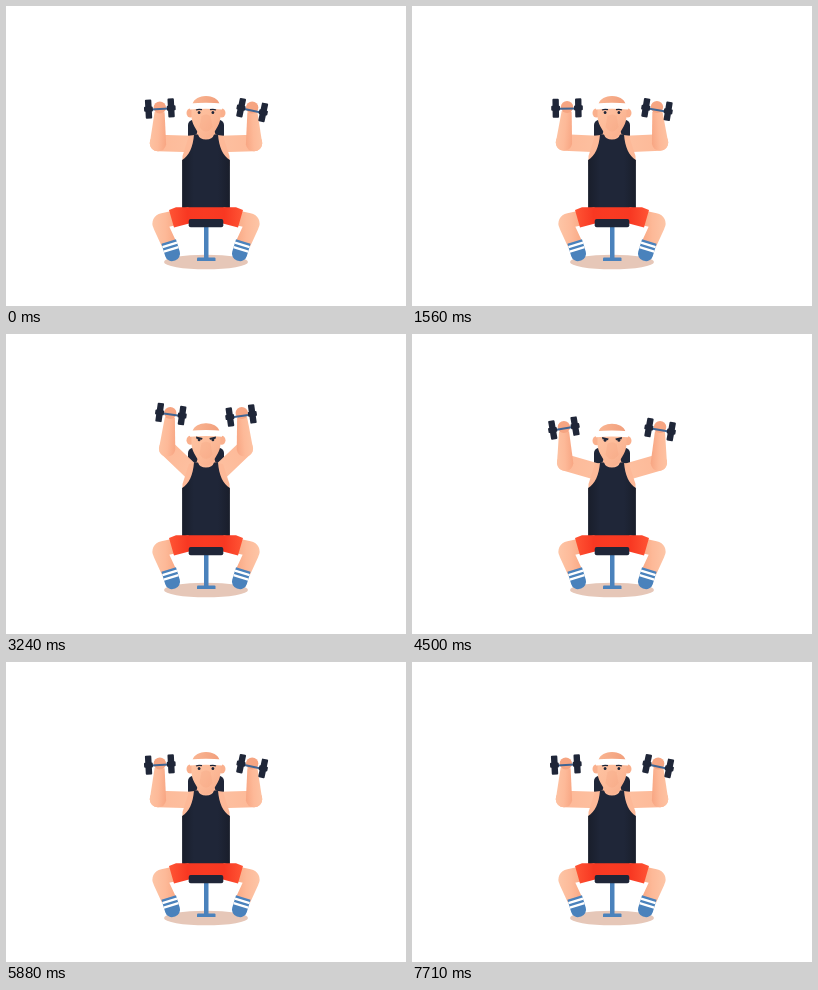
Write an HTML page with a canvas that moves like this. It is 400 by 300 pixels and loops after 7740 ms.

```html
<!DOCTYPE html>
<html>
<head>
<meta charset="utf-8">
<style>
html, body { margin: 0; width: 100%; height: 100%; overflow: hidden; background: #fff; }
canvas { display: block; width: 400px; height: 300px; }
</style>
</head>
<body>
<canvas id="stage" width="400" height="300"></canvas>
<script>
const c = document.getElementById('stage').getContext('2d');
const LOOP = 7740, MID = 200;
const DARK = '#1f2638', BLUE = '#4a82bc', SKIN = '#fdb998';

// Each lift is centred on one of these times.
const LIFTS = [430, 1830, 3240, 4650, 6360], LEAD = 330;

// ms from lift centre, upper arm angle, forearm lean, dumbbell tilt
const KEYS = [
  [-330, 0, 3, -7.5], [-270, 1, 5, -5], [-150, 15, -2, -10], [0, 44, 5, 8],
  [150, 62, 3, 10], [600, 71, 0, 10], [720, 66, 2, 9], [855, 41, 5, 3],
  [1000, 12, 5, -3], [1090, 0, 3, -7.5]
];

const rad = d => d * Math.PI / 180;

function slope(i, k) {
  const a = KEYS[i - 1], b = KEYS[i + 1];
  return a && b ? (b[k] - a[k]) / (b[0] - a[0]) : 0;
}

function pose(tau) {
  const t = Math.max(KEYS[0][0], Math.min(KEYS[KEYS.length - 1][0], tau));
  let i = 0;
  while (i < KEYS.length - 2 && t > KEYS[i + 1][0]) i++;
  const a = KEYS[i], b = KEYS[i + 1], d = b[0] - a[0], s = (t - a[0]) / d;
  return [1, 2, 3].map(k =>
    (1 + 2 * s) * (1 - s) ** 2 * a[k] + s * (1 - s) ** 2 * d * slope(i, k) +
    s * s * (3 - 2 * s) * b[k] + s * s * (s - 1) * d * slope(i + 1, k));
}

function fill(path, color) {
  c.fillStyle = color;
  c.fill(new Path2D(path));
}

function stroke(path, color, width, cap = 'butt') {
  c.strokeStyle = color;
  c.lineWidth = width;
  c.lineCap = cap;
  c.lineJoin = 'round';
  c.stroke(new Path2D(path));
}

function oval(x, y, rx, ry, color) {
  c.fillStyle = color;
  c.beginPath();
  c.ellipse(x, y, rx, ry, 0, 0, 7);
  c.fill();
}

function box(x, y, w, h, r, color) {
  c.fillStyle = color;
  c.beginPath();
  c.roundRect(x, y, w, h, r);
  c.fill();
}

function shade(x0, y0, x1, y1, ...colors) {
  const g = c.createLinearGradient(x0, y0, x1, y1);
  colors.forEach((color, i) => g.addColorStop(i / (colors.length - 1), color));
  return g;
}

// Draws a left-hand part and its mirror image.
function both(draw) {
  for (const right of [0, 1]) {
    c.save();
    if (right) {
      c.translate(2 * MID, 0);
      c.scale(-1, 1);
    }
    draw(right);
    c.restore();
  }
}

function dumbbell() {
  stroke('M-9 .5H9', '#3f6594', 2);
  for (const side of [-1, 1]) {
    box(side * 11.3 - 3.2, -9.5, 6.4, 19, 1, DARK);
    box(side * 11.4 - 4.4, -2.5, 8.8, 5, 1, DARK);
  }
}

function arm([angle, lean, tilt], right) {
  const a = rad(angle), b = rad(lean);
  const ex = 184.5 - 32.5 * Math.cos(a), ey = 137 - 32.5 * Math.sin(a);
  const hx = ex + 35 * Math.sin(b), hy = ey - 35 * Math.cos(b);
  const skin = shade(ex - 8, ey, ex + 9, ey - 3, '#fdc2a2', SKIN, '#f8a683');
  stroke(`M186 138L${ex} ${ey}`, shade(ex, ey, 186, 138, SKIN, '#fdc0a0'), 16.5, 'round');
  c.save();
  c.translate(ex, ey);
  c.rotate(b);
  fill('M-8.2 1L-5 -31H5L8.2 1Q7 8.2 0 8.2T-8.2 1Z', skin === null ? SKIN : shade(-8, 0, 8, 0, '#fdc2a2', SKIN, '#f8a683'));
  c.restore();
  oval(hx, hy - 0.5, 6.2, 6, '#f6a582');
  c.save();
  c.translate(hx + Math.max(0, tilt) * 0.08, hy + (right ? 2 : 0.5));
  c.rotate(rad(tilt + (right ? -4.5 : 4.5) * Math.max(0, 1 - angle / 16)));
  dumbbell();
  c.restore();
}

function head(angry) {
  both(() => oval(184.5, 107, 4, 4.5, '#fab08d'));
  fill('M185.5 104C185.5 86 214.5 86 214.5 104V110C214.5 118 209.5 123 207.5 128Q200 137 192.5 128C190.5 123 185.5 118 185.5 110Z',
    shade(186, 100, 214, 122, '#fec3a2', '#fdbc9a', '#f9b08e'));
  fill('M186.5 98C189 87.3 211 87.3 213.5 98Z', shade(188, 92, 212, 96, '#f9b491', '#f2a07d'));
  fill('M195.5 110Q200 107 204.5 110L206.5 121Q200 130 193.5 121Z', 'rgba(246,160,126,.28)');
  fill('M183.5 97.5Q200 96 216.5 97.5L216 103.5Q200 102 184 103.5Z', '#fff');
  both(() => {
    oval(193.1, 106.4, 1.4, 1.5, DARK);
    if (angry) fill('M190 103.3L196.6 104.8L196 106.6L190.4 105.4Z', DARK);
    else stroke('M190 104Q192.5 102.8 196 103.7', DARK, 1.2);
  });
}

function leg() {
  stroke('M184 208.5L157 214.5Q152.5 215.5 154.5 219.5L163 238', shade(147, 0, 172, 0, '#fdc5a6', SKIN, '#f8a580'), 15);
  c.save();
  c.translate(163, 236.5);
  c.rotate(rad(-17));
  box(-7.6, -1, 15.2, 20, [0, 0, 7, 7], BLUE);
  box(-7.6, 1.4, 15.2, 2.3, 0, '#fff');
  box(-7.6, 6, 15.2, 2.3, 0, '#fff');
  c.restore();
}

function draw(t) {
  const rep = LIFTS.filter(r => t >= r - LEAD).pop();
  const tau = rep === undefined ? -LEAD : t - rep;
  const now = pose(tau);

  c.fillStyle = '#fff';
  c.fillRect(0, 0, 400, 300);
  oval(200, 256, 42, 7.3, '#e6c7b8');
  box(198, 220, 4.5, 32, 0, BLUE);
  box(191, 251.5, 18.5, 3.5, [1, 1, 0, 0], BLUE);

  box(182, 114, 36, 40, 5, DARK);
  both(right => arm(now, right));
  fill('M192.5 122H207.5L209.5 128.5L217 130L223.5 150V160H176.5V150L183 130L190.5 128.5Z', SKIN);
  c.save();
  c.translate(0, -now[0] / 60);
  head(tau > -220 && tau < 800);
  c.restore();

  fill('M188 128.5H192Q193.5 133.5 200 133.5T208 128.5H212C213 141 217 150 223.9 154V202H176.1V154C183 150 187 141 188 128.5Z',
    shade(176, 0, 224, 0, '#191e2b', DARK, DARK, DARK, '#191e2b'));
  both(leg);
  fill('M170 201.3H230L237 204L232 221.5L215 217H185L168 221.5L163 204Z',
    shade(163, 0, 237, 0, '#ff5535', '#f83822', '#f93a22', '#f83822', '#ff5535'));
  box(182.7, 213, 34.6, 8.3, 2, DARK);
}

function tick(now) {
  draw(now % LOOP);
  requestAnimationFrame(tick);
}
draw(0);
requestAnimationFrame(tick);
</script>
</body>
</html>
```
